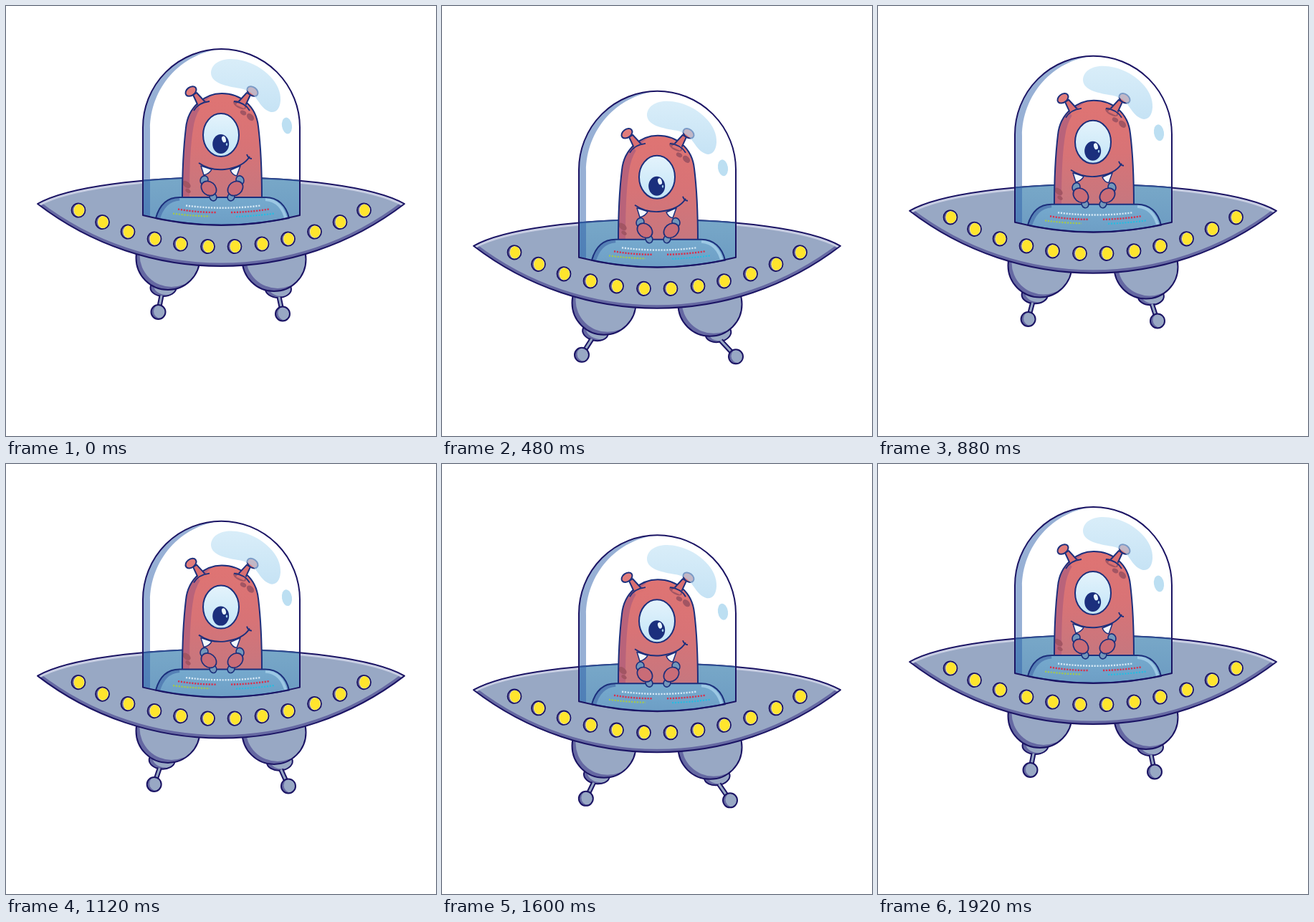
An HTML page with a canvas that plays this animation: 600x600 px, repeating every 1.96 s.

```html
<!DOCTYPE html>
<html lang="en">
<head>
<meta charset="utf-8">
<title>Flying saucer</title>
<style>
html, body { margin: 0; width: 100%; height: 100%; overflow: hidden; background: #fff; }
canvas { display: block; width: 600px; height: 600px; }
</style>
</head>
<body>
<canvas id="stage" width="600" height="600"></canvas>
<script>
const ctx = document.getElementById('stage').getContext('2d');
const STEP = 40, LOOP = 1960, DROP = 58.8;
const INK = '#1b1464', NAVY = '#1c2f7c', STEEL = '#98a8c4', SHADE = '#6568a2';

const HULL_TOP = 'M44 276C130 227 470 227 556 276';
const HULL_LOW = 'M556 276C405 392 195 392 44 276';
const hull = new Path2D(HULL_TOP + HULL_LOW.replace('M556 276', '') + 'Z');
const hullTop = new Path2D(HULL_TOP);
const hullLow = new Path2D(HULL_LOW);
const dome = new Path2D('M191 292V169.5A109.5 109.5 0 0 1 410 169.5V292Q300 320 191 292Z');
const domeInner = new Path2D('M201 310V172C201 114 244 66 300 60H420V310Z');
const consoleShape = new Path2D('M209 296C214 278 225 267 242 267H362C379 267 391 278 395 296Q300 315 209 296Z');
const body = new Path2D('M246 268C246 230 248 195 251 170C254 140 278 122 301 122C328 122 349 140 352 168C356 200 357 240 357 268Z');
const bodyLit = new Path2D('M256 270C256 232 257 196 261 172C264 148 276 130 296 120H370V270Z');

function paint(path, fill, line, width = 2) {
  if (fill) { ctx.fillStyle = fill; ctx.fill(path); }
  if (line) { ctx.strokeStyle = line; ctx.lineWidth = width; ctx.stroke(path); }
}

function draw(d, fill, line, width) { paint(new Path2D(d), fill, line, width); }

function oval(x, y, rx, ry, fill, line, tilt = 0, width = 2) {
  const p = new Path2D();
  p.ellipse(x, y, rx, ry, tilt, 0, Math.PI * 2);
  paint(p, fill, line, width);
  return p;
}

function inside(path, paintAll) {
  ctx.save();
  ctx.clip(path);
  paintAll();
  ctx.restore();
}

function fade(y0, y1, ...colors) {
  const g = ctx.createLinearGradient(0, y0, 0, y1);
  colors.forEach((c, i) => g.addColorStop(i / (colors.length - 1), c));
  return g;
}

// Round steel part with a dark crescent on its lower left.
function steelBall(x, y, rx, ry, dx, dy, tilt = 0) {
  const p = oval(x, y, rx, ry, SHADE, null, tilt);
  inside(p, () => oval(x + dx, y - dy, rx, ry, STEEL, null, tilt));
  paint(p, null, INK);
}

function leg(u, pod, cup, rod, ball, side, swing) {
  const [px, py] = pod, [cx, cy] = cup;
  steelBall(cx + side * 5.5 * u, cy + 3 * u, 18, 12, 5, 2, -side * 0.2 * u);
  steelBall(px, py + 4 * u, 44.5, 44.5, 5, 4);
  const x0 = rod[0] + side * 8 * u, y0 = rod[1] + 2 * u;
  const x1 = ball[0] + side * swing * u, y1 = ball[1] + u;
  const line = new Path2D(`M${x0} ${y0}L${x1} ${y1}`);
  paint(line, null, INK, 7);
  paint(line, null, STEEL, 3);
  steelBall(x1, y1, 10, 10, 3.5, 1);
}

function drawHull() {
  paint(hull, STEEL);
  inside(hull, () => {
    paint(hullLow, null, SHADE, 9);
    paint(hullTop, null, '#c8cee3', 8);
  });
  paint(hull, null, INK);
}

function drawLights() {
  const half = [[101, 285], [134.5, 301.5], [170, 315], [207, 325], [243.5, 332], [281.5, 335.5]];
  const all = half.concat(half.map(([x, y]) => [600.5 - x, y]));
  for (const [x, y] of all) {
    const rim = oval(x, y, 9.5, 9.7, '#66649b');
    inside(rim, () => {
      oval(x + 2, y, 8.6, 9.3, '#fff4a6');
      oval(x + 1, y, 6.8, 8.3, '#ffe52d');
    });
    paint(rim, null, INK, 1.8);
  }
}

function drawAntenna(flip) {
  ctx.save();
  if (flip) { ctx.translate(602, 0); ctx.scale(-1, 1); }
  draw('M261 124L268 139L278 134L266 121Z', '#d96f71', NAVY);
  oval(258, 119, 8.3, 5.8, '#e07c7b', NAVY, -0.65);
  draw('M267 138L278 133L281 138L270 143Z', '#dc7272');
  draw('M262 146Q268 135 284 133', null, NAVY, 1.8);
  ctx.restore();
}

function drawAlien() {
  paint(body, '#b9637a');
  inside(body, () => {
    paint(bodyLit, fade(122, 268, '#df7473', '#d87376', '#c6777f'));
    const spots = [[326, 138, 10, 4.5, 0.5], [331, 149, 4.5, 3, 0.5], [341, 155, 6, 4, 0.8],
      [252, 249, 6.5, 4, 0.7], [254, 258, 4, 2.5, 0.6]];
    for (const [x, y, rx, ry, a] of spots) oval(x, y, rx, ry, '#a25563', null, a);
  });
  paint(body, null, NAVY);
  drawAntenna(false);
  drawAntenna(true);

  oval(300, 180, 25, 30, fade(150, 210, '#e4f3fc', '#c3e5f7'), NAVY);
  oval(299.7, 192.5, 11.5, 13.5, '#1b2f7d');
  oval(304, 186, 2.8, 4.5, '#e9f7ff', null, -0.3);
  oval(308, 193, 1.2, 2, '#9fcdeb');

  draw('M272 223L276 236Q284 234 287 228Z', '#f2f8fd', NAVY, 1.5);
  draw('M313 229Q316 236 322 237L327 223Z', '#f2f8fd', NAVY, 1.5);
  draw('M269 219Q285 230 305 228Q331 225 340 210M336 207Q338 213 343 213', null, NAVY, 1.9);
}

function drawHands() {
  for (const side of [-1, 1]) {
    ctx.save();
    ctx.translate(301.5, 0);
    ctx.scale(side, 1);
    oval(25, 243, 5.3, 6.3, '#7397bb', NAVY, -0.4, 1.6);
    oval(12.5, 266.5, 4.8, 5.5, '#7397bb', NAVY, 0.4, 1.6);
    oval(18.5, 254.5, 11.5, 9.2, '#c96c77', NAVY, -0.7, 1.7);
    ctx.restore();
  }
}

function drawConsole() {
  paint(consoleShape, fade(267, 306, '#76aace', '#6d9ec5'));
  inside(consoleShape, () => {
    draw('M209 298C214 279 225 267 242 266', null, '#5580b5', 11);
    draw('M362 270C377 271 387 281 391 299', null, '#9cc8e4', 4);
  });
  paint(consoleShape, null, NAVY);

  ctx.setLineDash([2.2, 1.7]);
  draw('M251 278.5Q303 285 355 278.5', null, '#d5e8f5', 2.4);
  draw('M240 283.5Q266 288 293 288', null, '#d92f4b', 2.4);
  draw('M314 288Q341 287.5 367 283.5', null, '#d92f4b', 2.4);
  draw('M233 289.5Q258 293 284 293.5', null, '#a5c94d', 2.2);
  draw('M321 294Q348 293 374 289.5', null, '#28bce0', 2.2);
  ctx.setLineDash([]);
}

function drawGlass() {
  const shadow = new Path2D(dome);
  inside(dome, () => {
    const rest = new Path2D('M0 0H600V600H0Z');
    rest.addPath(domeInner);
    ctx.fillStyle = 'rgba(48,98,172,.5)';
    ctx.fill(rest, 'evenodd');
  });
  draw('M286 94C286 77 307 70 330 76C359 83 385 108 383 132C382 147 373 152 363 145C350 136 350 120 327 115C308 112 287 108 286 94Z',
    fade(72, 150, 'rgba(192,226,245,.6)', 'rgba(166,211,239,.65)'));
  oval(392, 167, 7, 11.5, 'rgba(160,209,236,.7)', null, -0.15);
  paint(shadow, null, INK);
}

function render(ms) {
  const n = Math.floor((ms % LOOP) / STEP);
  const u = 1 - Math.abs((n % 24) / 12 - 1);
  ctx.setTransform(1, 0, 0, 1, 0, 0);
  ctx.fillStyle = '#fff';
  ctx.fillRect(0, 0, 600, 600);
  ctx.translate(0, DROP * u);
  ctx.lineJoin = 'round';

  leg(u, [226, 351.5], [219.5, 393], [217, 404], [212.5, 427], -1, 17.5);
  leg(u, [374, 353.5], [380, 395], [381, 406], [386, 429.5], 1, 24);
  drawHull();
  drawLights();
  inside(dome, () => {
    paint(hull, fade(239, 306, '#78a8c8', '#6c9bc2'));
    paint(hullTop, null, '#2b4a90', 2);
  });
  drawAlien();
  drawConsole();
  drawHands();
  drawGlass();
}

const start = performance.now();
function tick() {
  render(performance.now() - start);
  requestAnimationFrame(tick);
}
tick();
</script>
</body>
</html>
```
